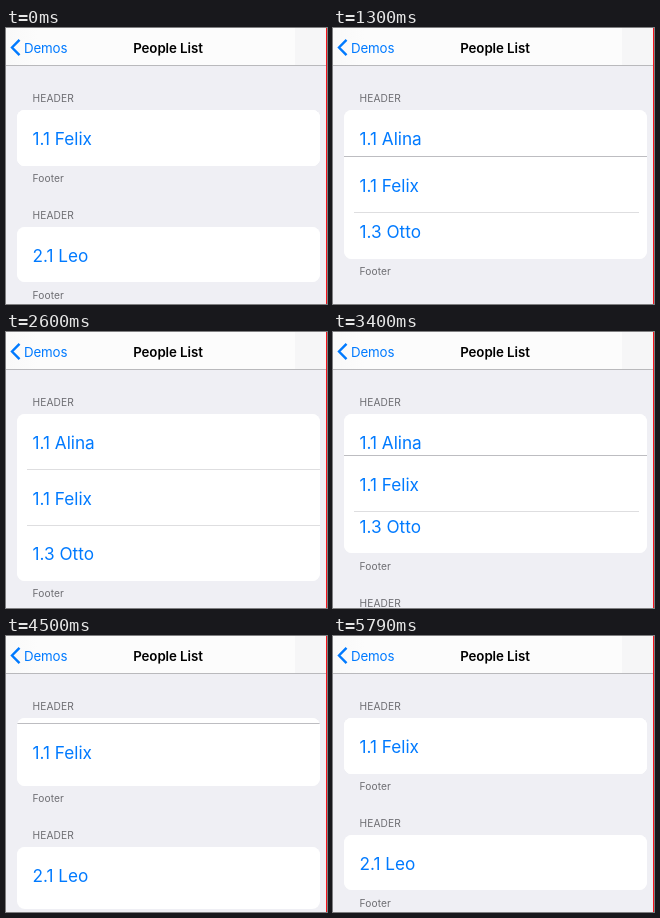
An HTML page for the animation above (5890 ms loop, 321x276 px).

```html
<!DOCTYPE html>
<html lang="en">
<head>
<meta charset="utf-8">
<title>People List</title>
<style>
  html, body { margin: 0; width: 100%; height: 100%; overflow: hidden; }
  body { background: #efeff4; font-family: Inter, Roboto, sans-serif; }
  #stage { position: relative; width: 321px; height: 276px; overflow: hidden; background: #efeff4; }
  #stage * { position: absolute; box-sizing: border-box; white-space: nowrap; }

  nav { left: 0; top: 0; width: 321px; height: 38px; border-bottom: 1px solid #b9b9bc;
        background: linear-gradient(90deg, #f9f9f9, #fcfcfc 32px); }
  nav i { left: 289px; top: 0; width: 32px; height: 37px; background: #f6f6f7; }
  nav svg { left: 0; top: 0; }
  nav span { top: 10px; line-height: 20px; font-size: 13.3px; }
  .back { left: 18px; color: #007aff; letter-spacing: -.01em; }
  .title { left: 0; width: 324px; text-align: center; font-weight: 600; letter-spacing: -.005em; color: #000; }

  .note { left: 26.5px; height: 14px; line-height: 14px; font-size: 10.2px; letter-spacing: .01em; color: #6d6d72; }
  .card { left: 10.5px; width: 303px; height: 55.5px; border-radius: 8px; background: #fff; overflow: hidden; }
  .row { left: 0; top: 0; width: 303px; height: 55.5px; padding-left: 16px; background: #fff;
         line-height: 58px; font-size: 17.2px; color: #007aff; }
  #middle { z-index: 1; }
  #middle::before, #middle::after { content: ""; position: absolute; left: 10.5px; right: 0; height: 1px; background: #dedee0; }
  #middle::before { top: -.75px; }
  #middle::after { top: 55px; opacity: var(--fade); }
  #middle.moving::before { left: 0; background: #bdbdc1; }
  #middle.moving::after { right: 8px; }
  #middle.closed::before, #middle.closed::after { display: none; }
  #below { left: 0; top: 0; width: 321px; height: 276px; }
  #edge { left: 320px; top: 0; width: 1px; height: 276px; background: #f5131c; }
</style>
</head>
<body>
<div id="stage">
  <div class="note" style="top:63px">HEADER</div>
  <div class="card" id="group" style="top:82px">
    <div class="row">1.1 Alina</div>
    <div class="row" id="last">1.3 Otto</div>
    <div class="row" id="middle">1.1 Felix</div>
  </div>
  <div id="below">
    <div class="note" style="top:143px">Footer</div>
    <div class="note" style="top:180px">HEADER</div>
    <div class="card" id="second" style="top:198.5px"><div class="row">2.1 Leo</div></div>
    <div class="note" id="foot">Footer</div>
  </div>
  <nav>
    <i></i>
    <svg width="18" height="37"><path d="M13.5 11.8 6 19.5l7.5 7.7" fill="none" stroke="#007aff" stroke-width="2.4"/></svg>
    <span class="back">Demos</span>
    <span class="title">People List</span>
  </nav>
  <div id="edge"></div>
</div>
<script>
  const LOOP = 5890, ROW = 55.5, STEP = 100, PACE = 0.44;
  // Each move steps along an eased curve, then settles at `end`.
  const moves = [
    { at: 200, end: 500, open: true, phase: 0.208 },
    { at: 1300, end: 1600, open: false, phase: 0.255 },
    { at: 2300, end: 2600, open: true, phase: 0.2 },
    { at: 3400, end: 3700, open: false, phase: 0.322 },
    { at: 4500, end: 4790, open: true, phase: 0.208 },
    { at: 5590, end: 5790, open: false, phase: -0.12 }
  ];
  const [group, middle, last, below, second, foot] =
    ["group", "middle", "last", "below", "second", "foot"].map(id => document.getElementById(id));
  const ease = x => { x = Math.min(1, Math.max(0, x)); return x * x * (3 - 2 * x); };

  function stateAt(t) {
    const move = moves.filter(m => t >= m.at).pop();
    if (!move) return { amount: 0, moving: false, open: false };
    const moving = t < move.end;
    const step = Math.floor((t - move.end) / STEP) + 3;
    const done = moving ? ease(move.phase + step * PACE) : 1;
    return { amount: move.open ? done : 1 - done, moving, open: move.open };
  }

  function draw(t) {
    const { amount, moving, open } = stateAt(t);
    const shift = ROW * amount;
    // The first card gains two rows, the second card one.
    group.style.height = ROW + 2 * shift + "px";
    second.style.height = ROW + shift + "px";
    middle.style.top = shift + "px";
    last.style.top = below.style.top = 2 * shift + "px";
    foot.style.top = 260 + shift + "px";
    middle.style.setProperty("--fade", moving && open && amount < 0.3 ? 0 : 1);
    middle.classList.toggle("moving", moving);
    middle.classList.toggle("closed", !moving && !open);
  }

  const start = performance.now();
  function tick() {
    draw((performance.now() - start) % LOOP);
    requestAnimationFrame(tick);
  }
  tick();
</script>
</body>
</html>
```
